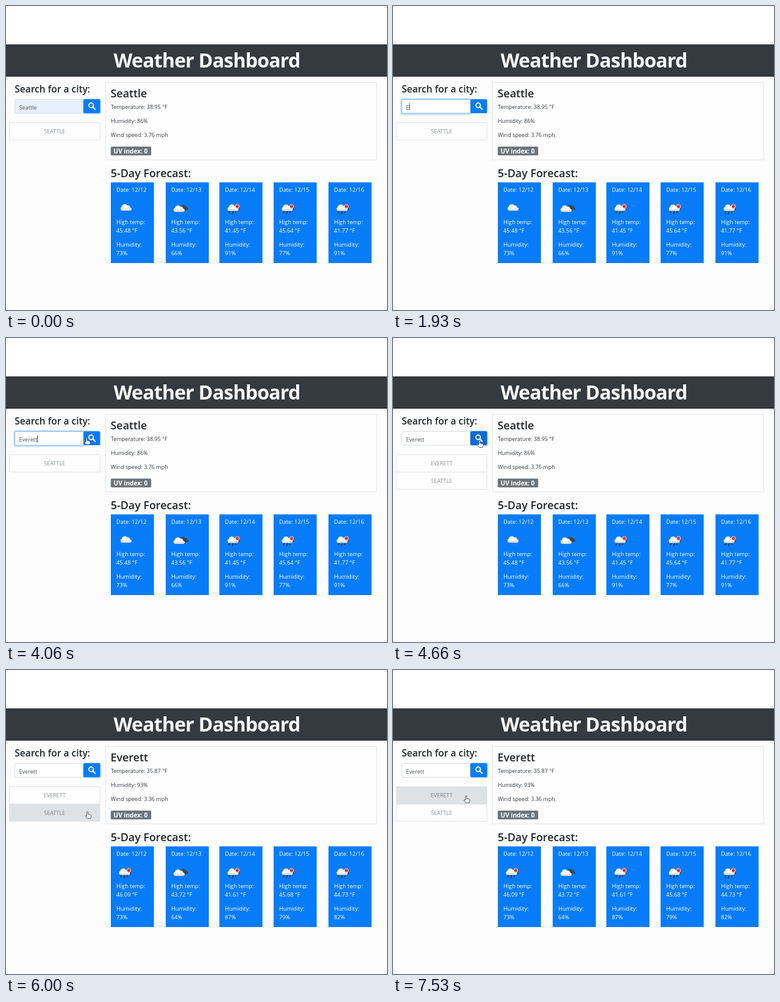
An HTML page that plays this animation: 625 by 499 pixels, repeating every 8000 ms.

```html
<!DOCTYPE html>
<html lang="en">
<head>
<meta charset="utf-8">
<title>Weather Dashboard</title>
<style>
  html, body { margin: 0; width: 100%; height: 100%; overflow: hidden; background: #fdfdfd; }
  svg { display: block; width: 100vw; height: 100vh; }
  text { font-family: "Open Sans", "Noto Sans", sans-serif; fill: #343a40; white-space: pre; }
  .title { font-size: 32px; font-weight: 700; letter-spacing: -.75px; fill: #fff; }
  .head { font-size: 17.9px; font-weight: 600; fill: #212529; }
  .search { font-size: 15.5px; font-weight: 600; fill: #212529; }
  .body { font-size: 9px; }
  .card { font-size: 9.2px; fill: #fff; }
  .badge { font-size: 10.1px; font-weight: 700; fill: #fff; }
  .item { font-size: 9px; fill: #8b9095; text-anchor: middle; }
  .field { font-size: 9.1px; fill: #495057; }
</style>
</head>
<body>
<svg id="stage" viewBox="0 0 625 499">
  <defs>
    <linearGradient id="puff" x2="0" y2="1">
      <stop offset=".5" stop-color="#fff"/><stop offset="1" stop-color="#d3d6da"/>
    </linearGradient>
    <path id="cloudShape" d="M4 11A3.400 3.400 0 0 1 3.500 4.500A5 5 0 0 1 12.500 2.500A3.800 3.800 0 0 1 17 5.500A2.800 2.800 0 0 1 17.500 11Z"/>
    <g id="cloud"><use href="#cloudShape" x="14.5" y="325" fill="url(#puff)"/></g>
    <g id="broken">
      <use href="#cloudShape" transform="translate(21.500 326) scale(.8)" fill="#3f4347"/>
      <use href="#cloudShape" x="11.5" y="327" fill="url(#puff)"/>
    </g>
    <g id="rain">
      <use href="#cloudShape" transform="translate(18.500 327) scale(.78)" fill="#44484c"/>
      <path d="M18 335l-2 4.500M23 335l-1.500 6M28 335l-1.500 4" stroke="#343b43" stroke-width="2" stroke-linecap="round"/>
      <use href="#cloudShape" x="12" y="325.5" fill="url(#puff)"/>
      <circle cx="29.5" cy="329" r="3.3" fill="#e8352d" stroke="#fff" stroke-width=".8"/>
    </g>
  </defs>
</svg>
<script>
const LOOP = 8000;
const stage = document.getElementById('stage');

function add(tag, attrs, parent = stage) {
  const el = document.createElementNS('http://www.w3.org/2000/svg', tag);
  for (const k in attrs) el.setAttribute(k, attrs[k]);
  parent.append(el);
  return el;
}
const set = (el, attrs) => { for (const k in attrs) el.setAttribute(k, attrs[k]); };
const rect = (x, y, width, height, more, parent) => add('rect', { x, y, width, height, ...more }, parent);
function label(x, y, cls, str, parent) {
  const el = add('text', { x, y, class: cls }, parent);
  el.textContent = str;
  return el;
}

// Page
rect(0, 0, 625, 63, { fill: '#fff' });
rect(0, 63, 625, 53, { fill: '#343a40' });
rect(0, 114.5, 625, 1.5, { fill: '#2b3035' });
label(176.5, 101, 'title', 'Weather Dashboard');
label(14.3, 141.7, 'search', 'Search for a city:');
rect(163.5, 125.5, 444.5, 127, { fill: '#fefefe', stroke: '#e3e5e8' });
rect(171.8, 230.7, 66.4, 14.5, { rx: 2, fill: '#6c757d' });
label(176.5, 241.5, 'badge', 'UV index: 0');
label(171.7, 280.5, 'head', '5-Day Forecast:');

// Search row
const fieldGlow = rect(13.5, 152.5, 115, 25, { rx: 3, fill: 'none', stroke: '#b5d8ff', 'stroke-width': 2.2 });
const field = rect(14.5, 153.5, 113, 22.5, { rx: 2 });
const marked = rect(21, 159, 29, 13, { fill: '#2f8cf5' });
const typed = label(21.5, 169.5, 'field', '');
const caret = rect(0, 159.5, 1, 12, { fill: '#343a40' });
const buttonGlow = rect(126.5, 152.5, 29, 24.5, { rx: 3, fill: 'none', stroke: '#b9d9fd', 'stroke-width': 1.4 });
const button = rect(127, 153, 27.5, 23, { rx: 2.5 });
add('circle', { cx: 139.7, cy: 163, r: 3.7, fill: 'none', stroke: '#fff', 'stroke-width': 1.9 });
add('path', { d: 'M142.7 166L146 169.3', stroke: '#fff', 'stroke-width': 2.4, 'stroke-linecap': 'round' });

// History list
function makeItem(y, name) {
  const g = add('g', {});
  const box = rect(5.5, y, 148.5, 28.5, { rx: 1.5, stroke: '#e0e2e4' }, g);
  const text = label(79.7, y + 17.7, 'item', name, g);
  return { g, box, text };
}
const second = makeItem(219.8, 'SEATTLE');
const first = makeItem(191.5, 'SEATTLE');

// Weather views
const COLUMNS = [172, 262, 350, 439, 529];
function makeView(city, now, days) {
  const g = add('g', {});
  label(171.5, 150, 'head', city, g);
  ['Temperature: ' + now[0] + ' °F', 'Humidity: ' + now[1] + '%', 'Wind speed: ' + now[2] + ' mph']
    .forEach((line, i) => label(172, 169 + i * 23, 'body', line, g));
  days.forEach(([icon, temp, humidity], i) => {
    const card = add('g', { transform: `translate(${COLUMNS[i]} 0)` }, g);
    rect(0, 289.5, 70.7, 132.5, { fill: '#077cf9' }, card);
    add('use', { href: '#' + icon }, card);
    [[305, 'Date: 12/' + (12 + i)], [358, 'High temp:'], [372, temp + ' °F'],
      [395, 'Humidity:'], [409, humidity + '%']]
      .forEach(([y, str]) => label(9, y, 'card', str, card));
  });
  return g;
}
const seattle = makeView('Seattle', ['38.95', 86, '3.76'], [
  ['cloud', '45.48', 73], ['broken', '43.56', 66], ['rain', '41.45', 91],
  ['rain', '45.64', 77], ['rain', '41.77', 91]]);
const everett = makeView('Everett', ['35.87', 93, '3.36'], [
  ['rain', '46.09', 73], ['broken', '43.72', 64], ['rain', '41.61', 87],
  ['rain', '45.68', 79], ['rain', '44.73', 82]]);

// Pointer and click ring; the hand's origin is its fingertip
const ring = add('circle', { fill: 'none', stroke: '#e9746c', 'stroke-width': 2.2 });
const hand = add('path', {
  d: 'M-1 1Q0-1 1 1V5L5 6Q6.5 6.5 6 9L5 12H-.5L-3.5 8Q-4 6-1 7.5Z',
  fill: '#fff', stroke: '#30363c', 'stroke-width': .8, 'stroke-linejoin': 'round'
});

const TYPING = [[0, 'Seattle'], [1660, ''], [1930, 'E'], [2060, 'Ev'], [2200, 'Eve'],
  [2330, 'Ever'], [2530, 'Evere'], [2730, 'Everet'], [3000, 'Everett']];
const PATH = [[4060, 132, 163], [4130, 142, 167.5], [5060, 142, 167.5], [5260, 138, 200],
  [5530, 133.5, 238], [5860, 133.5, 236], [6260, 134, 224], [6460, 134, 214],
  [6600, 134, 212.5], [6860, 129, 209], [7060, 125, 208], [7330, 125, 208], [7530, 120, 206]];

function handAt(t) {
  let i = PATH.findIndex(p => p[0] > t);
  if (i < 0) i = PATH.length;
  const a = PATH[Math.max(0, i - 1)], b = PATH[i] || a;
  const k = b === a ? 0 : Math.max(0, (t - a[0]) / (b[0] - a[0]));
  return [a[1] + (b[1] - a[1]) * k, a[2] + (b[2] - a[2]) * k];
}
const show = (el, on) => el.setAttribute('visibility', on ? 'visible' : 'hidden');
const ramp = (t, start, len) => Math.min(1, Math.max(0, (t - start) / len));

function draw(t) {
  const word = TYPING.filter(s => s[0] <= t).pop()[1];
  const selected = t >= 1000 && t < 1660;
  const clicked = t >= 4400;

  if (typed.textContent !== word) typed.textContent = word;
  typed.style.fill = selected ? '#fff' : '';
  show(marked, selected);
  const focus = ramp(t, 930, 150) * (1 - ramp(t, 4400, 150));
  set(fieldGlow, { opacity: focus });
  set(field, {
    fill: t < 1660 ? '#e8f0fe' : '#fff',
    stroke: focus > .5 ? '#80bdff' : '#d8dde2'
  });
  show(caret, t >= 1660 && t < 4400 && !(t >= 3530 && t < 4060));
  set(caret, { x: 21.5 + (word ? typed.getComputedTextLength() : 0) });
  set(buttonGlow, { opacity: 1 - ramp(t, 930, 150) + ramp(t, 4400, 150) });

  const [x, y] = handAt(t);
  set(hand, { transform: `translate(${x} ${y})` });
  show(hand, t >= 4060);
  const onButton = t >= 4130 && y < 177;
  set(button, { fill: onButton ? '#0b6bd6' : '#067cfa' });

  const over = t < 4400 ? 0 : y >= 220 ? 2 : y >= 191 ? 1 : 0;
  first.text.textContent = clicked ? 'EVERETT' : 'SEATTLE';
  show(second.g, clicked);
  [first, second].forEach((item, i) => {
    const hot = over === i + 1;
    set(item.box, { fill: hot ? '#dfe2e5' : '#fefefe' });
    item.text.style.fill = hot ? '#7b8187' : '';
  });

  show(seattle, t < 4800);
  show(everett, t >= 4800);

  const press = t >= 4400 ? [4400, 142, 167.5, 200] : [800, 68.5, 164, 260];
  const age = t - press[0];
  show(ring, age >= 0 && age < press[3]);
  set(ring, { cx: press[1], cy: press[2], r: 18.5, opacity: 1 - .8 * ramp(age, 66, press[3]) });
}

const start = performance.now();
function tick() {
  draw((performance.now() - start) % LOOP);
  requestAnimationFrame(tick);
}
tick();
</script>
</body>
</html>
```
